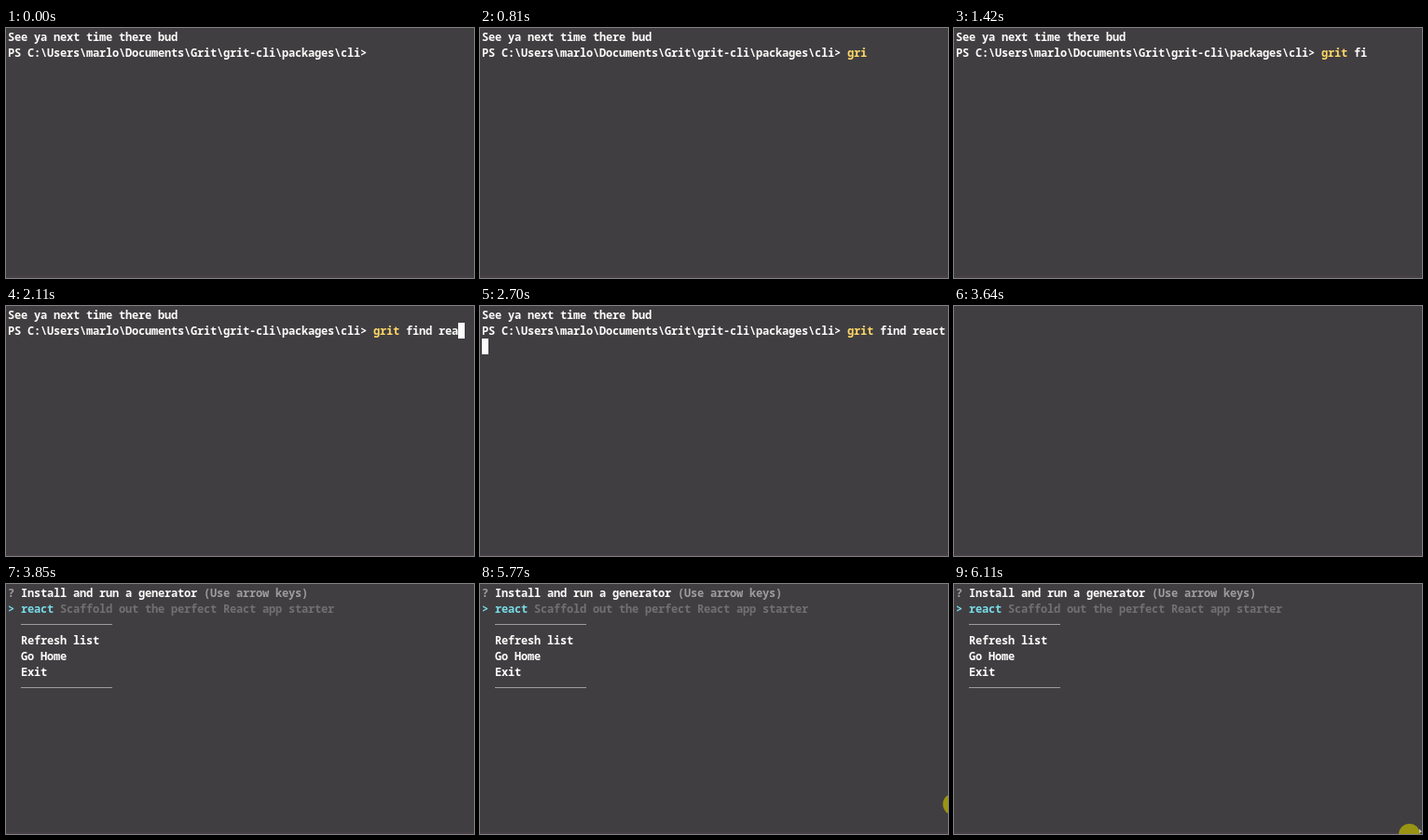
Write an HTML page with a canvas that moves like this. It is 502x269 px and loops after 6.18 s.

```html
<!DOCTYPE html>
<html lang="en">
<head>
<meta charset="utf-8">
<title>Terminal</title>
<style>
  html, body { margin: 0; width: 100%; height: 100%; overflow: hidden; background: #403e41; }
  canvas { display: block; width: 502px; height: 269px; }
</style>
</head>
<body>
<canvas id="stage" width="502" height="269"></canvas>
<script>
const ctx = document.getElementById('stage').getContext('2d');
const W = 502, H = 269, LOOP = 6180;
const CELL = 7, LINE = 17, LEFT = 2, TOP = 1;
const C = {
  bg: '#403e41', text: '#fcfcfa', yellow: '#ffd866', cyan: '#78dce8',
  faint: '#727072', dim: '#9e9d9d', edge: '#483f47', spot: '#9a9414'
};
const PROMPT = 'PS C:\\Users\\marlo\\Documents\\Grit\\grit-cli\\packages\\cli> ';
const COMMAND = 'grit find react';

// [time, typed characters, cursor shown]
const typing = [
  [0, 0, false], [600, 0, true], [670, 1, false], [740, 2, false], [810, 3, false],
  [880, 4, false], [950, 4, true], [1020, 5, true],
  [1290, 6, true], [1420, 7, false], [1490, 8, false], [1550, 9, false], [1620, 10, true],
  [1970, 11, false], [2040, 12, false], [2110, 13, true], [2240, 14, true], [2370, 15, true]
];
// [time, menu rows shown]
const menuSteps = [[3640, 0], [3710, 1], [3780, 4], [3850, 7]];
// [time, x, y]
const spotPath = [
  [5770, 508, 237], [5840, 504, 241], [5910, 499, 248], [5980, 494, 258], [6110, 488.5, 269.5]
];

const stepAt = (list, t) => list.filter(s => s[0] <= t).pop();

function print(str, col, row, color, weight = 600) {
  ctx.font = `${weight} 12px "Noto Sans Mono", "DejaVu Sans Mono", monospace`;
  ctx.fillStyle = color;
  ctx.textAlign = 'center';
  [...str].forEach((ch, i) => {
    if (ch !== ' ') ctx.fillText(ch, LEFT + (col + i + 0.5) * CELL, TOP + row * LINE + 13);
  });
}

function cursor(col, row) {
  ctx.fillStyle = C.text;
  ctx.fillRect(LEFT + col * CELL, TOP + row * LINE, CELL, LINE);
}

function rule(row) {
  ctx.fillStyle = C.dim;
  ctx.fillRect(LEFT + 2 * CELL, TOP + row * LINE + 8, 14 * CELL, 1);
}

function shell(t) {
  const [, count, on] = stepAt(typing, t);
  const typed = COMMAND.slice(0, count);
  print('See ya next time there bud', 0, 0, C.text);
  print(PROMPT, 0, 1, C.text);
  print(typed.slice(0, 4), PROMPT.length, 1, C.yellow);
  print(typed.slice(4), PROMPT.length + 4, 1, C.text);
  if (t < 2700) {
    if (on) cursor(PROMPT.length + count, 1);
  } else if (t < 3300) {
    cursor(0, 2);
  } else if (t >= 3370 && t < 3440) {
    cursor(0, 0);
  }
}

const menu = [
  () => {
    print('?', 0, 0, C.dim);
    print('Install and run a generator', 2, 0, C.text, 700);
    print('(Use arrow keys)', 30, 0, C.dim);
  },
  () => {
    print('>', 0, 1, C.cyan, 700);
    print('react', 2, 1, C.cyan);
    print('Scaffold out the perfect React app starter', 8, 1, C.faint);
  },
  () => rule(2),
  () => print('Refresh list', 2, 3, C.text),
  () => print('Go Home', 2, 4, C.text),
  () => print('Exit', 2, 5, C.text),
  () => rule(6)
];

function spot(t) {
  const step = stepAt(spotPath, t);
  if (!step) return;
  const [, x, y] = step;
  ctx.fillStyle = C.spot;
  ctx.beginPath();
  ctx.arc(x, y, 11.5, 0, Math.PI * 2);
  ctx.fill();
  // tip of the pointer
  ctx.fillStyle = '#c9c8c4';
  ctx.beginPath();
  ctx.moveTo(x + 10.5, y - 6);
  ctx.lineTo(x + 13.5, y - 3);
  ctx.lineTo(x + 10.5, y - 1.5);
  ctx.fill();
}

function draw(t) {
  ctx.fillStyle = C.bg;
  ctx.fillRect(0, 0, W, H);
  ctx.fillStyle = C.edge;
  ctx.fillRect(0, H - 2, W, 2);
  if (t < 3570) shell(t);
  else if (t < 3640) cursor(0, 0);
  else menu.slice(0, stepAt(menuSteps, t)[1]).forEach(row => row());
  spot(t);
}

const start = performance.now();
function tick() {
  draw((performance.now() - start) % LOOP);
  requestAnimationFrame(tick);
}
tick();
</script>
</body>
</html>
```
